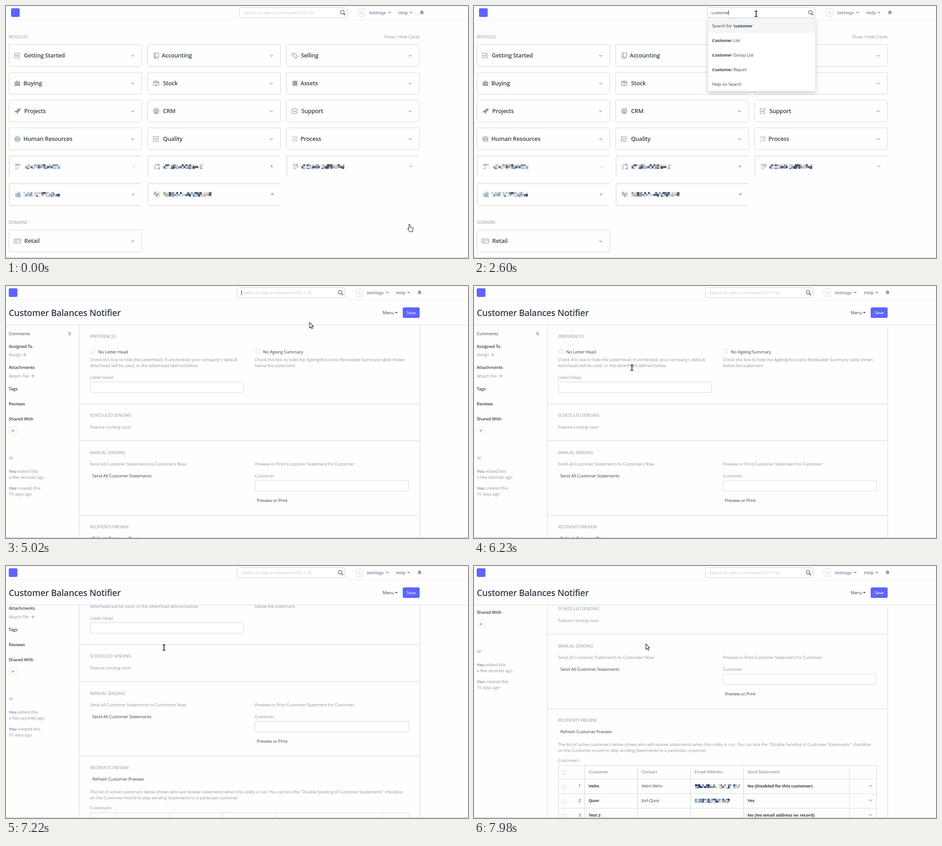
An HTML page for the animation above (8 s loop, 1012 by 553 pixels).

```html
<!DOCTYPE html>
<html lang="en">
<head>
<meta charset="utf-8">
<title>Desk search</title>
<style>
  html, body { margin: 0; width: 100%; height: 100%; overflow: hidden; background: #fefefe; }
  svg { display: block; }
  text { font: 9.5px "Open Sans", "Noto Sans", sans-serif; letter-spacing: -.018em; fill: #8d99a6; white-space: pre; }
  .dark { fill: #36414c; }
  .bold { font-weight: 600; }
  .strong { font-weight: 700; }
  .caps { font-size: 9px; }
  .card { font-size: 12.7px; font-weight: 600; fill: #36414c; }
  .title { font-size: 19.2px; font-weight: 600; fill: #36414c; }
  .hint { fill: #c3c9cf; }
  .white { fill: #fff; }
  .end { text-anchor: end; }
  .mid { text-anchor: middle; }
  .line { fill: none; stroke: #d1d8dd; }
  .icon { fill: none; stroke: #8d99a6; stroke-width: 1.2; }
  .solid { fill: #8d99a6; stroke: none; }
  .cursor { fill: #fff; stroke: #222; stroke-width: 1.1; stroke-linejoin: round; }
  .shadow { filter: drop-shadow(0 4px 5px rgba(0, 0, 0, .18)); }
</style>
</head>
<body>
<svg id="stage" width="1012" height="553"></svg>
<script>
const LOOP = 8000;
const ACCENT = '#5e64ff';
const TITLE = 'Customer Balances Notifier';
const QUERY = 'customer bala';

// Text is placed by its left edge and the vertical middle of its line.
const text = (x, y, s, cls = '', drop = 3.4) =>
  `<text x="${x}" y="${y + drop}" class="${cls}">${s}</text>`;
const box = (x, y, w, h, r = 3, attrs = 'class="line"') =>
  `<rect x="${x}" y="${y}" width="${w}" height="${h}" rx="${r}" ${attrs}/>`;
const path = (d, cls = 'line', attrs = '') => `<path d="${d}" class="${cls}" ${attrs}/>`;
const at = (x, y, s) => `<g transform="translate(${x} ${y})">${s}</g>`;
const down = (x, y, size = 3.2, fill = '#7d8894') =>
  `<path d="M${x - size} ${y - size / 2}h${size * 2}l${-size} ${size}z" fill="${fill}"/>`;
const plus = (x, y) => path(`M${x - 3.5} ${y}h7M${x} ${y - 3.5}v7`, 'icon');

let seed = 7;
const random = () => (seed = seed * 16807 % 2147483647) / 2147483647;
const tones = ['#2f4264', '#4c5b70', '#8793a0', '#b7c3cf', '#d8dfe6', '#7fa3c4', '#e2c4a6', '#fefefe', '#dfe4e9'];
const pale = ['#aab4be', '#c9d0d7', '#e3e7eb', '#fefefe'];

function mosaic(x, y, w, h, colors) {
  let s = '';
  for (let i = 0; i < w; i += 4)
    for (let j = 0; j < h; j += 4)
      s += box(x + i, y + j, Math.min(4, w - i), Math.min(4, h - j), 0,
        `fill="${colors[Math.floor(random() * colors.length)]}"`);
  return s;
}

const icons = {
  check: path('M4 0V5.5H-6V-5H3M-3.5 -1L-1 2L6 -5', 'icon', 'stroke-width="1.6"'),
  book: path('M-4.5 3.5V-5.5H5.5V3.5H-4.5V6H5.5M-2 -5V3M0 4V7', 'icon'),
  tag: path('M-6 -5H-1L6 2L2 6L-6 -1Z', 'icon') + '<circle cx="-3.5" cy="-2.5" r=".9" class="solid"/>',
  briefcase: path('M-6 -3H6V.3H-6ZM-6 1.3H6V5.5H-6Z', 'solid') + path('M-2 -3V-5H2V-3', 'icon'),
  cube: path('M-6 -3L0 -5.5L6 -3V3.5L0 6L-6 3.5ZM-6 -3L0 -.5L6 -3M0 -.5V6M-3 -4L3 -1.7V1', 'icon'),
  stack: [-4, -.5, 3].map(y => `<ellipse cy="${y}" rx="5.5" ry="1.6" class="solid"/>` +
    path(`M-5.5 ${y + .8}Q0 ${y + 3.6} 5.5 ${y + .8}V${y + 1.8}Q0 ${y + 4.4} -5.5 ${y + 1.8}Z`, 'solid')).join(''),
  rocket: path('M7 -6Q1 -6 -2 -1L-5 -.5L-7 3L-3 2L-1 4L-2 7L1 5L2 2Q7 -1 7 -6Z', 'solid'),
  signal: '<circle r="6" class="icon"/><circle r="3.4" class="icon"/><circle r="1.4" class="solid"/>' +
    path('M-1.5 2H1.5L.8 6.5H-.8Z', 'solid'),
  people: [[-3.7, -2], [3.7, -2], [0, -4]].map(([x, y]) => `<circle cx="${x}" cy="${y}" r="2" class="icon"/>`).join('') +
    path('M-6 1H6L4 3V5.5H-4V3ZM-2 1V6M2 1V6', 'icon'),
  list: path('M-1.5 -4H6M-1.5 0H6M-1.5 4H6M-4 -6V-2M-5.5 1H-3.5M-5.5 4H-3.5M-5.5 6H-3.5', 'icon'),
  payment: path('M-7 -4.5H7V4.5H-7ZM-7 -1.5H7M-5 2H0', 'icon')
};

function card(x, y, name, icon, indent) {
  return box(x + .5, y + .5, 291, 48) + at(x + 19, y + 24.5, icons[icon]) +
    text(x + indent, y + 24.5, name, 'card', 4.6) +
    path(`M${x + 268.5} ${y + 23.5}l3 3l3 -3`, 'icon', 'stroke-width="1.5"');
}

function hiddenCard(x, y, textX, textW, closed) {
  const bar = 'fill="#e6e8ea"';
  return box(x + 1, y, 290, 2.6, 0, bar) + box(x, y + 2, 2.4, 45, 0, bar) +
    (closed ? box(x + 2, y + 48, 287, 2.6, 0, bar) : '') +
    mosaic(x + 14, y + 19, 13, 12, pale) + mosaic(x + textX, y + 20, textW, 10, tones) +
    mosaic(x + 270, y + 22, 6, 5, pale);
}

function navbar() {
  return box(11, 5, 19, 19, 3, `fill="${ACCENT}"`) +
    box(511.5, 3.5, 236, 22.5, 3, 'fill="#fff" stroke="#ced5db"') +
    '<circle cx="736.8" cy="13.8" r="3.9" fill="none" stroke="#555" stroke-width="1.3"/>' +
    '<path d="M739.6 16.6l3.6 3.6" stroke="#555" stroke-width="1.8"/>' +
    box(771.5, 6.5, 15, 16) + text(779, 14.5, 'A', 'hint mid') +
    text(795, 14.5, 'Settings', 'strong') + down(840, 14.5) +
    text(859, 14.5, 'Help', 'strong') + down(887, 14.5) +
    path('M906.5 17Q908 16 908 12.5Q908 10.3 911 10Q914 10.3 914 12.5Q914 16 915.5 17ZM909.6 18H912.4L911 19.3Z', 'solid');
}

function modules() {
  const rows = [
    [['Getting Started', 'check', 33], ['Accounting', 'book', 31], ['Selling', 'tag', 32]],
    [['Buying', 'briefcase', 32], ['Stock', 'cube', 34], ['Assets', 'stack', 31]],
    [['Projects', 'rocket', 34], ['CRM', 'signal', 34], ['Support', 'check', 33]],
    [['Human Resources', 'people', 32], ['Quality', 'check', 34], ['Process', 'list', 31]]
  ];
  return text(6, 68, 'MODULES', 'caps') + text(906, 68, 'Show / Hide Cards', 'end') +
    rows.map((row, j) => row.map((c, i) => card(6 + 304 * i, 84 + 61 * j, ...c)).join('')).join('') +
    hiddenCard(6, 327.5, 36, 78) + hiddenCard(310, 327.5, 35, 86) + hiddenCard(614, 327.5, 33, 94) +
    hiddenCard(6, 388.5, 32, 80, true) + hiddenCard(310, 388.5, 35, 106, true) +
    text(6, 474.5, 'DOMAINS', 'caps') + card(6, 491, 'Retail', 'payment', 34);
}

function sidebar() {
  const heads = [['Assigned To', 132.5], ['Attachments', 178.5], ['Tags', 225.5], ['Reviews', 259], ['Shared With', 292]];
  const you = s => `<tspan class="strong">You</tspan> ${s}`;
  return text(6, 104.5, 'Comments', 'dark') + text(142, 104.5, '0', 'dark end') +
    heads.map(([s, y]) => text(6, y, s, 'dark bold')).join('') +
    text(6, 151, 'Assign') + plus(41, 151) + text(6, 197.5, 'Attach File') + plus(59, 197.5) +
    box(6.5, 308.5, 17, 17, 3, 'class="line" stroke-dasharray="2 1"') + plus(15, 317.5) +
    '<path d="M11 382.5L6.5 378Q5.5 374.5 8.5 374Q10 374 11 375.5Q12 374 13.5 374Q16.5 374.5 15.5 378Z" fill="#d1d8dd"/>' +
    text(6, 407, you('edited this')) + text(6, 420, 'a few seconds ago') +
    text(6, 444, you('created this')) + text(6, 457, '15 days ago');
}

function table() {
  const columns = [184.5, 242.5, 358.5, 474.5, 590.5, 822.5, 881.5];
  const rows = [
    ['Velm', 'Velm-Velm', 'No (Disabled for this customer)', 98],
    ['Quor', 'Jorl-Quor', 'Yes', 76],
    ['Test 2', '', 'No (No email address on record)', 0]
  ];
  const tick = y => box(193.5, y - 2, 8, 8, 1);
  return columns.map(x => path(`M${x} 627V780`)).join('') +
    [627.5, 657.5, 689.5, 721.5, 753.5].map(y => path(`M184 ${y}H882`)).join('') + tick(641.5) +
    ['Customer', 'Contact', 'Email Address', 'Send Statement']
      .map((s, i) => text(columns[i + 1] + 8.5, 641.5, s, 'bold')).join('') +
    rows.map(([name, contact, status, width], i) => {
      const y = 673 + 31.6 * i;
      return tick(y) + text(234, y, i + 1, 'dark end') + text(251, y, name, 'dark strong') +
        text(367, y, contact, 'dark') + text(599, y, status, 'dark strong') +
        mosaic(484, y - 4, width, 9, tones) + down(868.5, y + .5, 4.5, '#bfc5ca');
    }).join('');
}

function form() {
  const option = (x, s) => box(x + 2.5, 139.5, 8, 8, 1) + text(x + 18, 144.5, s, 'dark');
  const input = (x, y) => box(x + .5, y, 336, 23, 3, 'fill="#fff" stroke="#d1d8dd"');
  return path('M160.5 60V800M906.5 60V800M160 258.5H906M160 339.5H906M160 503.5H906') +
    text(184, 111, 'PREFERENCES', 'caps') +
    option(184, 'No Letter Head') + option(545, 'No Ageing Summary') +
    text(184, 161.5, "Check this box to hide the Letterhead. If unchecked, your company's default") +
    text(184, 174.5, 'letterhead will be used, or the letterhead defined below') +
    text(545, 161.5, 'Check this box to hide the Ageing/Accounts Receivable Summary table shown') +
    text(545, 174.5, 'below the statement') +
    text(184, 200.5, 'Letter Head') + input(184, 210.5) +
    text(184, 283.5, 'SCHEDULED SENDING', 'caps') + text(184, 309.5, 'Feature coming soon') +
    text(184, 365.5, 'MANUAL SENDING', 'caps') +
    text(184, 390.5, 'Send all Customer Statements to Customers Now') +
    text(189, 417, 'Send All Customer Statements', 'dark') +
    text(545, 390.5, 'Preview or Print Customer Statement for Customer:') +
    text(545, 417, 'Customer') + input(545, 427) + text(549.5, 470.5, 'Preview or Print', 'dark') +
    text(184, 529, 'RECIPIENTS PREVIEW', 'caps') + text(189, 554, 'Refresh Customer Preview', 'dark') +
    text(184, 581.5, 'The list of active customers below shows who will receive statements when this utility is run. You can tick the "Disable Sending of Customer Statements" checkbox') +
    text(184, 594.5, 'on the Customer record to skip sending Statements to a particular customer') +
    text(184, 616.5, 'Customers') + table();
}

const stage = document.getElementById('stage');
stage.innerHTML = '<clipPath id="body"><rect y="86" width="1012" height="467"/></clipPath>' +
  `<g id="home">${modules()}</g>` +
  `<g id="page"><g clip-path="url(#body)"><g id="scroll">${sidebar()}${form()}</g></g>` +
  text(6, 59, TITLE, 'title', 6.6) + text(825, 58.5, 'Menu', 'dark') + down(855, 58.5, 3, '#36414c') +
  box(869, 47, 37, 23, 3, `fill="${ACCENT}"`) + text(887.5, 58.5, 'Save', 'white mid') + path('M0 85.5H1012') + '</g>' +
  path('M0 30.5H1012', 'line', 'style="stroke:#e9edf0"') +
  `<g id="nav">${navbar()}<text id="typed" x="520" y="17.9"></text>` +
  '<rect id="caret" y="9" width="1" height="11" fill="#333"/></g>' +
  '<g id="menu"></g><g id="pointer"></g><path d="M0 552.5H1012" stroke="#b9bdc1"/>';
const [home, page, scroller, nav, typed, caret, menu, pointer] =
  ['home', 'page', 'scroll', 'nav', 'typed', 'caret', 'menu', 'pointer'].map(id => document.getElementById(id));

// How many of n evenly spaced changes between start and end have happened.
const steps = (t, start, end, n) => t < start ? 0 :
  Math.min(n, 1 + Math.floor((t - start) * (n - 1) / (end - start) + .12));

const moves = [
  [100, 840, 8, 618, 17], [3050, 3270, 3, 620, 22], [4260, 4810, 6, 665, 80],
  [5570, 5790, 3, 566, 99], [6010, 6230, 3, 346, 179], [7760, 7980, 3, 376.5, 171]
];
function pointerAt(t) {
  let x = 884, y = 479;
  for (const [start, end, n, toX, toY] of moves) {
    const p = steps(t, start, end, n) / n, k = p * p * (3 - 2 * p);
    x += (toX - x) * k;
    y += (toY - y) * k;
  }
  return [x, y];
}

const cursors = {
  arrow: path('M0 0V12L2.8 9.6L4.7 13.6L6.7 12.7L5 8.8H8.6Z', 'cursor'),
  hand: path('M-1.5 10V.8Q0 -.8 1.4 .8V6L6.5 7.2Q8 8 7.8 9.5L7 13.5L6 16.5H0L-4 10.5Q-3.5 8.5 -1.5 10Z', 'cursor'),
  beam: path('M-3 -6H-.8L0 -5.3L.8 -6H3M-3 6H-.8L0 5.3L.8 6H3M0 -5.5V5.5', '', 'fill="none" stroke="#222" stroke-width="1.7"')
};
function cursorKind(t, y) {
  if (t < 100) return 'hand';
  if (t < 840) return 'arrow';
  if (t < 5020) return y > 27 ? 'hand' : 'beam';
  return t < 6230 || t >= 7870 ? 'arrow' : 'beam';
}

function suggestions(query, narrow) {
  if (!query) return ['Customer List', 'Item List', 'Sales Invoice List', 'Stock Balance', 'Help on Search'];
  const names = narrow ? [TITLE] : ['Customer List', 'Customer Group List', 'Customer Report'];
  const bold = s => `<tspan class="strong">${s}</tspan>`;
  return [`Search for '${bold(query)}'`,
    ...names.map(s => bold(s.slice(0, query.length)) + s.slice(query.length)), 'Help on Search'];
}

function drawMenu(rows, hover) {
  const h = 32 * rows.length;
  const shade = i => box(512, 27 + 32 * i, 236, 32, 0, 'fill="#f3f5f7"');
  return box(512, 27, 236, h, 2, 'fill="#fff" stroke="#d9dee2" stroke-width=".8" class="shadow"') +
    shade(0) + (hover ? shade(1) : '') +
    rows.map((s, i) => text(521.5, 43.5 + 32 * i, s, 'dark')).join('');
}

const scrollStops = [0, 6, 18, 38, 61, 86, 112, 139, 152, 165, 177, 186, 190];

function draw(t) {
  const opened = t >= 5020;
  home.style.display = opened ? 'none' : '';
  page.style.display = opened ? '' : 'none';
  nav.setAttribute('transform', `translate(${opened ? -5 : 0} 0)`);
  scroller.setAttribute('transform',
    `translate(0 ${-scrollStops[steps(t, 6780, 7550, 8) + steps(t, 7650, 7980, 4)]})`);

  const word = steps(t, 1940, 2720, 8), more = steps(t, 3050, 3270, 3), last = steps(t, 3490, 4040, 6);
  const entry = opened ? '' : QUERY.slice(0, word + more + (last >= 3) + (last >= 5));
  typed.textContent = entry || 'Search or type a command (Ctrl + G)';
  typed.setAttribute('class', entry ? 'dark' : 'hint');
  caret.style.display = t >= 1390 && t < 5340 ? '' : 'none';
  caret.setAttribute('x', entry ? 520 + typed.getComputedTextLength() : 520);

  const [x, y] = pointerAt(t);
  const searched = last === 0 ? word : last < 4 ? 11 : last < 6 ? 12 : 13;
  menu.innerHTML = t >= 1500 && !opened
    ? drawMenu(suggestions(QUERY.slice(0, searched), last >= 2), y > 59) : '';
  pointer.innerHTML = at(x, y, cursors[cursorKind(t, y)]);
}

function tick() {
  draw(performance.now() % LOOP);
  requestAnimationFrame(tick);
}
tick();
</script>
</body>
</html>
```
